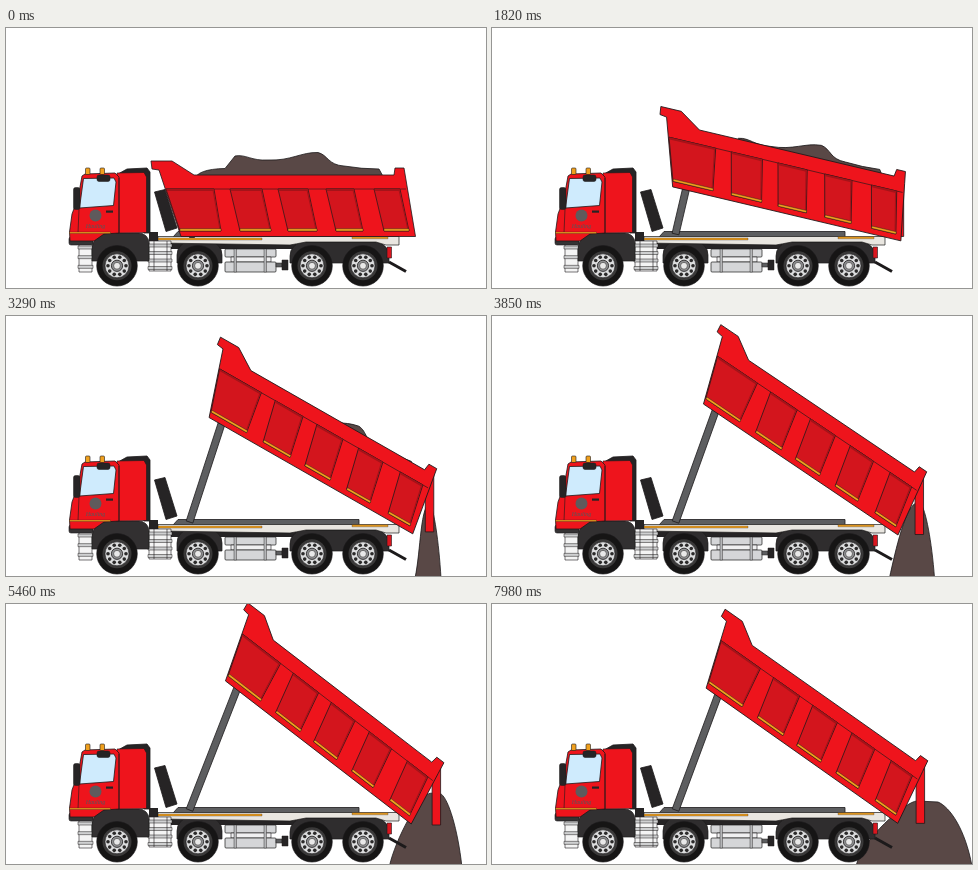
Animation, 480 px wide and 260 px high, one loop 8000 ms. Source, as an HTML page with a canvas:

```html
<!DOCTYPE html>
<html lang="en">
<head>
<meta charset="utf-8">
<title>Dump truck</title>
<style>
html, body { margin: 0; width: 100%; height: 100%; overflow: hidden; background: #fff; }
canvas { display: block; width: 480px; height: 260px; }
</style>
</head>
<body>
<canvas id="stage"></canvas>
<script>
const W = 480, H = 260, LOOP = 8000, STEP = 70;
const INK = '#1c1a1b', RED = '#ee141c', DARK_RED = '#d3151d', SHADE = '#a51319';
const SOIL = '#594846', STEEL = '#5d5e60', PALE = '#e4e4e3', AMBER = '#f0a01e', BLACK = '#262425';
const MAX_TILT = 37.6, RISE_END = 5040, LOWER_START = 6750;
const PIVOT = { x: 390.5, y: 208 };
const RAD = Math.PI / 180;

const canvas = document.getElementById('stage');
const ctx = canvas.getContext('2d');
const scale = window.devicePixelRatio || 1;
canvas.width = W * scale;
canvas.height = H * scale;
ctx.lineJoin = 'round';

function paint(fill, line = 0.8) {
  ctx.fillStyle = fill;
  ctx.fill();
  if (!line) return;
  ctx.strokeStyle = INK;
  ctx.lineWidth = line;
  ctx.stroke();
}

function poly(fill, pts, line) {
  ctx.beginPath();
  for (let i = 0; i < pts.length; i += 2) ctx.lineTo(pts[i], pts[i + 1]);
  ctx.closePath();
  paint(fill, line);
}

function box(fill, x, y, w, h, line, r = 0) {
  ctx.beginPath();
  ctx.roundRect(x, y, w, h, r);
  paint(fill, line);
}

function disc(fill, x, y, r, line = 0) {
  ctx.beginPath();
  ctx.arc(x, y, r, 0, Math.PI * 2);
  paint(fill, line);
}

function stroke(color, width, x1, y1, x2, y2) {
  ctx.beginPath();
  ctx.moveTo(x1, y1);
  ctx.lineTo(x2, y2);
  ctx.strokeStyle = color;
  ctx.lineWidth = width;
  ctx.stroke();
}

// Ease from 0 to 1 with separate horizontal handles x1 and x2.
function ease(x, x1, x2) {
  let lo = 0, hi = 1;
  for (let i = 0; i < 24; i++) {
    const s = (lo + hi) / 2, q = 1 - s;
    if (3 * q * q * s * x1 + 3 * q * s * s * x2 + s * s * s < x) lo = s; else hi = s;
  }
  return lo * lo * (3 - 2 * lo);
}

function tiltAt(t) {
  if (t < RISE_END) return MAX_TILT * ease(t / RISE_END, 0.315, 0.555);
  return MAX_TILT - 2.4 * Math.pow(Math.max(0, t - LOWER_START) / 1230, 2.1);
}

function toWorld(x, y, tilt) {
  const c = Math.cos(tilt * RAD), s = Math.sin(tilt * RAD);
  const dx = x - PIVOT.x, dy = y - PIVOT.y;
  return [PIVOT.x + dx * c - dy * s, PIVOT.y + dx * s + dy * c];
}

function turn(x, y, deg) {
  ctx.translate(x, y);
  ctx.rotate(deg * RAD);
  ctx.translate(-x, -y);
}

// Soil pours down first, then spreads: fast at the start, wider towards the end.
function drawPile(t) {
  const pour = Math.min(1, (t - 2650) / 600);
  if (pour <= 0) return;
  const k = Math.max(0, (t - 3290) / 4690);
  const burst = 1 - Math.exp(-6 * k);
  const left = 409 - 22 * burst - 23 * k * k;
  const right = 435 + 13 * burst + 32 * Math.pow(k, 1.7);
  const crest = 424 + 9 * burst + 13 * k * k;
  const top = 187 + 10 * k * k, base = 262, w = right - crest;

  ctx.save();
  ctx.beginPath();
  ctx.rect(0, 0, W, 200 + 62 * pour * pour);
  ctx.clip();
  ctx.beginPath();
  ctx.moveTo(left, base);
  ctx.bezierCurveTo(left + 6, 235, 414, top, 425, top);
  ctx.lineTo(crest, top + 1);
  ctx.bezierCurveTo(crest + w * 0.35, top + 6, right - w * 0.2, 225, right, base);
  ctx.closePath();
  paint(SOIL);
  ctx.restore();
}

function drawGate(tilt) {
  const [x, y] = toWorld(394, 146, tilt);
  ctx.save();
  turn(x, y, -Math.max(0, 10 - tilt));
  box(RED, x - 5, y, 8.5, 60);
  ctx.restore();
}

// The load slides out: it sinks around the rear and stays inside the bed walls.
function drawLoad(tilt) {
  const sink = 11 * Math.pow(tilt / 29.7, 0.75) + Math.max(0, tilt - 29.7) * 1.2;
  ctx.save();
  ctx.beginPath();
  ctx.rect(150, 100, 250, 60);
  ctx.clip();
  turn(400, 147, -sink);
  ctx.beginPath();
  ctx.moveTo(188, 152);
  ctx.quadraticCurveTo(191, 141, 219, 140.5);
  ctx.lineTo(229, 128);
  ctx.bezierCurveTo(240, 126, 245, 133, 262, 132);
  ctx.bezierCurveTo(285, 133, 295, 124, 312, 124.5);
  ctx.bezierCurveTo(322, 127, 322, 137, 338, 138);
  ctx.quadraticCurveTo(356, 141, 373, 141);
  ctx.lineTo(379, 152);
  ctx.closePath();
  paint(SOIL);
  ctx.restore();
}

function drawPanel(x, w, slant, lean) {
  const top = 161, low = 203, right = x + w, end = right + lean;
  poly(DARK_RED, [x, top, right, top, end, low, x + slant, low], 0.7);
  poly(SHADE, [x + 0.5, top, right, top, right - 0.5, top + 2, x + 1, top + 2], 0);
  stroke(SHADE, 1, right - 1, top + 1, end - 1, low - 1);
  box(AMBER, x + slant, low - 2.3, end - x - slant, 2.3, 0.4);
}

function drawBed(tilt) {
  ctx.save();
  turn(PIVOT.x, PIVOT.y, tilt);
  drawLoad(tilt);
  poly(RED, [145, 133, 166, 133, 188, 147, 388, 147, 389, 140, 398, 140, 400, 152,
    409.5, 208.5, 175, 208.5, 153, 142, 146, 141]);
  stroke(INK, 0.6, 160, 161, 400, 161);
  drawPanel(160, 48, 14, 7);
  for (let i = 0; i < 4; i++) drawPanel(224 + 48 * i, 32 - 2 * i, 10, 9);
  ctx.restore();
}

function drawPiston(tilt) {
  const foot = { x: 183.5, y: 206 };
  const [x, y] = toWorld(188.5, 206, tilt);
  const len = Math.hypot(x - foot.x, y - foot.y);
  const nx = (foot.y - y) / len * 3.5, ny = (x - foot.x) / len * 3.5;
  poly(STEEL, [foot.x + nx, foot.y + ny, x + nx, y + ny, x - nx, y - ny, foot.x - nx, foot.y - ny]);
}

function drawWheel(x) {
  const y = 237.8;
  disc('#161515', x, y, 20.3, 0.6);
  disc('#3a3939', x, y, 14.5);
  disc('#dcddde', x, y, 12, 0.6);
  for (let a = 0; a < 360; a += 36) {
    disc('#2b2a2a', x + 9 * Math.cos(a * RAD), y + 9 * Math.sin(a * RAD), 1.8);
  }
  disc('#8f9092', x, y, 5.6, 0.8);
  disc('#e8e8e8', x, y, 3.4, 0.5);
}

function drawFender(x, top, w) {
  ctx.beginPath();
  ctx.roundRect(x, top, w, 235 - top, [14, 14, 0, 0]);
  paint('#2f2d2e', 0.7);
}

function drawSteps(x, y, w, h, count) {
  box('#f4f4f4', x, y, w, h, 0.6);
  for (let i = 0; i < count; i++) box('#cfd0d1', x - 1, y + 3 + i * h / count, w + 2, 3, 0.5);
}

function drawTank() {
  box('#d5d6d8', 219, 221, 51, 8, 0.7, 1);
  box('#f0f0f1', 225, 229, 40, 5, 0.6);
  box('#d5d6d8', 219, 234, 51, 10, 0.7, 1);
  for (const x of [228, 258]) box('#b4b5b7', x, 221, 2.5, 23, 0.4);
  box(STEEL, 270, 235, 6, 4, 0.5);
  box(BLACK, 276, 232, 6, 10, 0.5);
}

function drawChassis() {
  poly(STEEL, [167, 209, 172, 203.5, 353, 203.5, 353, 209]);
  box(BLACK, 143, 204, 9, 9, 0);
  box(BLACK, 165, 214, 125, 7, 0);
  drawFender(171, 213, 45);
  drawFender(284, 214, 99);
  poly('#e9e6e0', [152, 208.5, 393, 208.5, 393, 217, 380, 217, 370, 214, 300, 214, 284, 217, 152, 215], 0.7);
  box(AMBER, 152, 210, 104, 2, 0.3);
  box(AMBER, 346, 208.8, 36, 2, 0.3);

  drawSteps(143, 213, 22, 30, 4);
  for (const x of [148, 161]) stroke(INK, 0.6, x, 213, x, 243);
  drawTank();
  box('#d9161e', 381, 219, 4.5, 11, 0.6);
  stroke(INK, 3, 383, 234, 400, 243.5);
  poly(BLACK, [148.5, 164, 159, 161.5, 171, 200, 160, 203.5]);
}

function drawCab() {
  drawSteps(73, 215, 13, 29, 3);
  box('#353334', 63, 209, 24, 8, 0.6, 2);
  ctx.beginPath();
  ctx.roundRect(86, 205, 57, 28, [16, 10, 0, 0]);
  paint('#323031', 0.7);

  poly(BLACK, [112, 146, 121, 141, 141, 140, 144, 144, 144, 205, 138, 205]);
  poly(RED, [111, 145, 138, 144.5, 140.5, 149, 140.5, 204.5, 110, 205], 0.6);
  poly(RED, [76, 148, 79, 146, 109, 145, 113, 149, 113, 205, 98, 206, 88, 213, 64, 213,
    63.5, 204, 66, 186, 72, 170]);
  poly('#cfebfd', [77.5, 150.5, 108, 150, 110, 154, 107.5, 177.5, 73.5, 180]);
  stroke(INK, 0.6, 73, 181, 72, 205);
  stroke(INK, 0.6, 113, 150, 113, 205);
  box(BLACK, 100, 182.5, 7, 2.2, 0);
  box(AMBER, 63.5, 204, 41, 1.5, 0.3);

  for (const x of [79.5, 94]) box(AMBER, x, 140, 4.5, 6.5, 0.6, 1);
  box(BLACK, 91, 147, 13, 6.5, 0.5, 2);
  box(BLACK, 67.5, 159.5, 6.5, 22, 0.5, 2);

  disc('#5f5a5c', 89.5, 187.5, 6);
  ctx.fillStyle = '#54595c';
  ctx.font = 'italic 6px "Liberation Serif", serif';
  ctx.textAlign = 'center';
  ctx.fillText('Hauling', 89.5, 200);
}

function draw(t) {
  const tilt = tiltAt(t);
  ctx.setTransform(scale, 0, 0, scale, 0, 0);
  ctx.fillStyle = '#fff';
  ctx.fillRect(0, 0, W, H);
  drawPile(t);
  drawChassis();
  drawGate(tilt);
  drawPiston(tilt);
  drawBed(tilt);
  drawCab();
  [111, 192, 306, 357].forEach(drawWheel);
}

const start = performance.now();
function tick() {
  const t = Math.max(0, performance.now() - start) % LOOP;
  draw(Math.floor(t / STEP) * STEP);
  requestAnimationFrame(tick);
}
tick();
</script>
</body>
</html>
```
